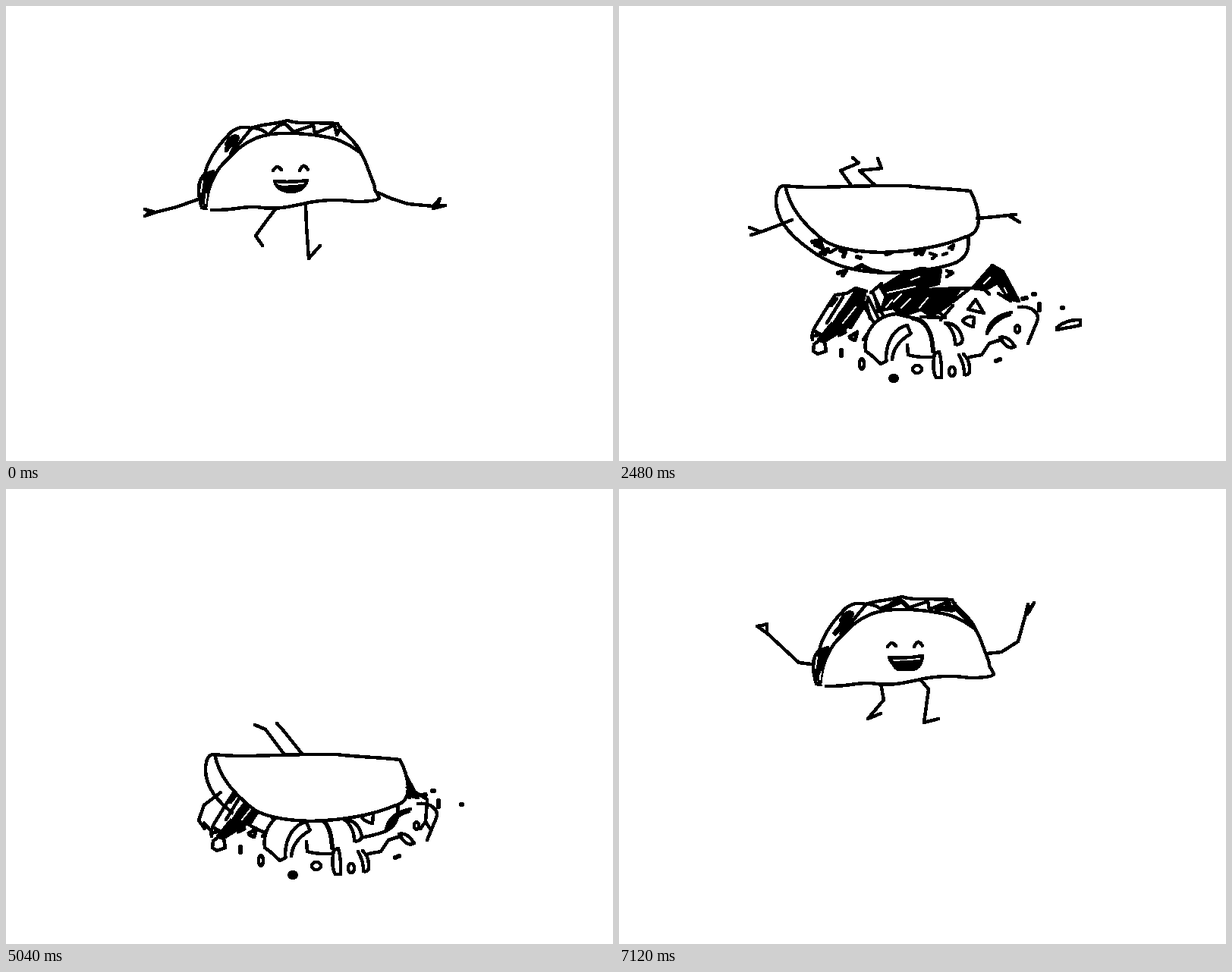
These frames come from a looping animation (800 px wide and 600 px high, 7.2 s). An HTML page without scripts:

```html
<!DOCTYPE html>
<html lang="en">
<head>
<meta charset="utf-8">
<title>Taco dive</title>
<style>
html, body { margin: 0; width: 100%; height: 100%; overflow: hidden; background: #fff; }
svg {
  display: block; width: 100vw; height: 100vh; shape-rendering: crispEdges;
  fill: none; stroke: #000; stroke-width: 4.5; stroke-linecap: round; stroke-linejoin: round;

  --kick: path("M355 268L342 285L329 303L338 316M395 262L396 290L399 333L414 316");
  --swap: path("M355 262L357 290L361 333L376 316M395 266L382 285L369 303L378 316");
  --tuck: path("M355 260L376 277L357 303L368 317M400 265L386 289L371 313L386 323");
  --hop: path("M349 261L357 282L341 307L346 320M398 262L387 301L370 313L382 321");
  --land: path("M343 266L347 287L326 312L343 305M396 261L406 273L400 317L419 312");

  --low: path("M253 255L225 265L197 272L183 268L190 272L183 277L197 272M490 246L508 254L530 261L563 264L572 254L568 264L579 263L563 267");
  --mid: path("M256 248L222 257L190 260L177 253L178 258L178 265L190 260M489 250L507 254L525 258L556 260L571 253L562 260L577 262L556 262");
  --flat: path("M254 250L225 249L195 249L176 243L190 247L176 252L195 249M487 245L503 244L520 242L550 241L568 233L556 240L573 243L550 241");
  --cheer: path("M252 240L235 238L193 199L180 190L186 189L193 187L193 199M483 226L502 224L524 210L534 174L537 161L539 170L545 159L536 174");

  --bent: path("M307 238L292 217L316 207L308 200M338 237L317 217L346 214L341 201");
  --straight: path("M310 236L298 220L286 204L272 198M334 236L318 216L310 206L301 196");

  --reach: path("M228 282L208 290L187 298L172 292M187 298L174 302M472 280L495 278L513 276L523 275M513 276L528 285");
  --dip: path("M228 282L206 302L190 330L180 336M190 330L190 341M472 280L494 298L505 326L500 336M505 326L514 337");
  --prop: path("M225 295L203 307L210 315L244 333M228 324L257 340M474 281L507 294L485 325L475 334M485 325L487 333");
  --push: path("M225 295L203 340L218 390L208 399M218 390L228 399M474 281L517 335L497 390L488 399M497 390L506 399");
}
.fill { fill: #000; }
.paper { fill: #fff; }
.up, .up *, .down, .down *, .pile, .pile * {
  animation-duration: 7.2s; animation-iteration-count: infinite; animation-timing-function: step-end;
}
.up { animation-name: show-up; }
.up > g { transform-origin: 372px 210px; animation-name: drift; }
.tilt { transform-origin: 377px 261px; animation-name: tilt; }
.up .legs { animation-name: run; }
.up .arms { animation-name: wave; }
.stuffed { animation-name: stuffed; }
.down { animation-name: show-down; }
.down > g { transform-origin: 340px 290px; animation-name: dive; }
.down .legs { animation-name: paddle; }
.down .arms { animation-name: dig; }
.crumbs { animation-name: crumbs; }
.meal { animation-name: meal; }
.pile { animation-name: slide; }
.chip { animation-name: chip; }
.spill { animation-name: spill; }
.right { animation-name: eat-right; }
.left { animation-name: eat-left; }
.middle { animation-name: eat-middle; }
.bits { animation-name: eat-bits; }

@keyframes show-up { 0% { visibility: visible } 30% { visibility: hidden } 94.44%, 100% { visibility: visible } }
@keyframes show-down { 0% { visibility: hidden } 30% { visibility: visible } 94.44%, 100% { visibility: hidden } }
@keyframes stuffed { 0% { opacity: 0 } 94.44%, 100% { opacity: 1 } }
@keyframes crumbs { 0% { opacity: 1 } 54.44%, 100% { opacity: 0 } }
@keyframes meal { 0% { opacity: 0 } 72.22%, 100% { opacity: 1 } }

@keyframes drift {
  0% { transform: translate(0, 0); animation-timing-function: steps(13) }
  14.44% { transform: translate(-27px, -45px); animation-timing-function: steps(9) }
  24.44% { transform: translate(-38px, -65px); animation-timing-function: steps(2) }
  26.66% { transform: translate(-38px, -86px); animation-timing-function: steps(3) }
  30% { transform: translate(-36px, -20px) scaleY(.15) }
  94.44% { transform: translate(8px, -75px) scaleY(.25); animation-timing-function: steps(1) }
  95.55% { transform: translate(5px, -118px) scaleY(1); animation-timing-function: steps(3) }
  98.88%, 100% { transform: translate(2px, -9px) scaleY(1) }
}
@keyframes tilt {
  0% { transform: rotate(0); animation-timing-function: steps(6) }
  6.66% { transform: rotate(6deg); animation-timing-function: steps(4) }
  11.11% { transform: rotate(1deg); animation-timing-function: steps(3) }
  14.44% { transform: rotate(6deg); animation-timing-function: steps(4) }
  18.88% { transform: rotate(0); animation-timing-function: steps(5) }
  24.44% { transform: rotate(2deg) }
  30%, 100% { transform: rotate(0) }
}
@keyframes run {
  0% { d: var(--kick); animation-timing-function: steps(3) }
  3.33% { d: var(--tuck); animation-timing-function: steps(3) }
  6.66% { d: var(--swap); animation-timing-function: steps(3) }
  10% { d: var(--kick); animation-timing-function: steps(4) }
  14.44% { d: var(--tuck); animation-timing-function: steps(3) }
  17.77% { d: var(--swap); animation-timing-function: steps(3) }
  21.11% { d: var(--kick); animation-timing-function: steps(3) }
  24.44% { d: var(--hop) }
  94.44% { d: var(--tuck); animation-timing-function: steps(4) }
  98.88%, 100% { d: var(--land) }
}
@keyframes wave {
  0% { d: var(--low); animation-timing-function: steps(6) }
  6.66% { d: var(--flat); animation-timing-function: steps(7) }
  14.44% { d: var(--mid); animation-timing-function: steps(9) }
  24.44% { d: var(--flat) }
  94.44% { d: var(--flat); animation-timing-function: steps(4) }
  98.88%, 100% { d: var(--cheer) }
}
@keyframes dive {
  0%, 30% { transform: translate(2px, -80px) scaleY(.2); animation-timing-function: steps(3) }
  33.33% { transform: translate(-3px, -4px); animation-timing-function: steps(1) }
  34.44% { transform: translate(0, 0); animation-timing-function: steps(4) }
  38.88% { transform: translate(3px, -3px) }
  43.33% { transform: translate(3px, -3px); animation-timing-function: steps(2) }
  45.55% { transform: translate(6px, -11px) }
  46.66% { transform: translate(6px, -11px); animation-timing-function: steps(2) }
  48.88% { transform: translate(19px, 30px) }
  53.33% { transform: translate(19px, 30px); animation-timing-function: steps(4) }
  57.77% { transform: translate(37px, 70px) }
  58.88% { transform: translate(37px, 70px); animation-timing-function: steps(5) }
  64.44% { transform: translate(56px, 113px) }
  83.33% { transform: translate(56px, 113px); animation-timing-function: steps(4) }
  87.77% { transform: translate(56px, 48px) }
  90% { transform: translate(56px, 48px); animation-timing-function: steps(4) }
  94.44%, 100% { transform: translate(40px, -150px) scaleY(.2) }
}
@keyframes paddle {
  0%, 34.44% { d: var(--bent) }
  43.33% { d: var(--bent); animation-timing-function: steps(2) }
  45.55% { d: var(--straight) }
  46.66% { d: var(--straight); animation-timing-function: steps(2) }
  48.88% { d: var(--bent) }
  53.33% { d: var(--bent); animation-timing-function: steps(4) }
  57.77%, 100% { d: var(--straight) }
}
@keyframes dig {
  0%, 46.66% { d: var(--reach); opacity: 1 }
  50% { d: var(--reach); animation-timing-function: steps(2) }
  52.22% { d: var(--dip); opacity: 1 }
  55.55% { d: var(--dip); opacity: 0 }
  61.11% { d: var(--dip); opacity: 1 }
  65.55% { d: var(--dip); opacity: 1; animation-timing-function: steps(10) }
  76.66% { d: var(--prop); opacity: 1 }
  83.33% { d: var(--prop); opacity: 1; animation-timing-function: steps(4) }
  87.77% { d: var(--push); opacity: 1 }
  90% { d: var(--push); opacity: 1; animation-timing-function: steps(4) }
  94.44%, 100% { d: var(--reach); opacity: 1 }
}
@keyframes slide {
  0% { visibility: hidden; transform: translate(-9px, -8px) }
  31.11% { visibility: visible; transform: translate(-9px, -8px) }
  34.44% { visibility: visible; transform: translate(0, 0); animation-timing-function: steps(4) }
  38.88% { visibility: visible; transform: translate(9px, 16px) }
  58.88% { visibility: visible; transform: translate(9px, 16px); animation-timing-function: steps(5) }
  64.44% { visibility: visible; transform: translate(16px, 18px) }
  80%, 100% { visibility: hidden; transform: translate(16px, 18px) }
}
@keyframes chip {
  0%, 34.44% { transform: translate(0, 0); opacity: 1; animation-timing-function: steps(4) }
  38.88% { transform: translate(7px, 4px); opacity: 1 }
  68.88%, 100% { transform: translate(7px, 4px); opacity: 0 }
}
@keyframes spill { 0% { opacity: 0 } 55.55% { opacity: 1 } 70%, 100% { opacity: 0 } }
@keyframes eat-right { 0% { opacity: 1 } 71.11%, 100% { opacity: 0 } }
@keyframes eat-left { 0% { opacity: 1 } 73.33%, 100% { opacity: 0 } }
@keyframes eat-middle { 0% { opacity: 1 } 75.55%, 100% { opacity: 0 } }
@keyframes eat-bits { 0% { opacity: 1 } 76.66%, 100% { opacity: 0 } }
</style>
</head>
<body>
<svg viewBox="0 0 800 600">
  <!-- upright, facing us -->
  <g class="up"><g>
    <path class="arms"/>
    <path class="legs"/>
    <g class="tilt">
      <path class="paper" d="M264 267L258 266C252 246 252 230 262 222C266 202 280 183 297 166Q308 157 323 161C340 155 356 156 371 151C385 156 400 153 437 155C440 165 452 170 458 179C467 187 470 197 472 208Q472 214 467 216"/>
      <path class="paper" stroke="none" d="M272 269C350 266 400 259 492 253L472 194C430 166 350 160 318 180C290 200 266 236 264 267Z"/>
      <path d="M271 269C300 270 310 264 330 265C360 270 380 263 400 259C430 254 445 256 460 258C475 258 490 257 492 253C490 246 484 243 486 238L478 217C470 195 468 193 462 190C440 174 425 173 405 170C380 167 350 166 330 174C308 183 300 195 285 209C272 224 265 245 263 267"/>
      <path d="M323 161Q336 160 346 170Q362 152 370 157L379 166L405 157L407 168L433 157L436 170L441 160M290 182Q297 169 305 172Q289 184 290 191L306 174L296 195L323 162M459 180L465 190"/>
      <path class="fill" d="M262 222L273 218L267 240L262 262L257 250Q254 235 262 222Z"/>
      <path stroke="#fff" stroke-width="2" d="M259 231L257 245M264 248L263 260"/>
      <path d="M352 217Q357 208 363 216M387 217Q392 205 398 216"/>
      <path class="paper" d="M354 231Q375 233 397 230Q392 245 375 245Q358 244 354 231Z"/>
      <path class="fill" stroke-width="2" d="M356 237Q375 239 395 235Q388 244 375 245Q360 244 356 237Z"/>
      <g class="stuffed">
        <path stroke-width="7" d="M283 199L301 178L292 200M345 167L370 157M417 166L438 168L430 161"/>
        <path d="M262 250L268 222L270 235M372 157L382 166M440 165L462 187L452 173"/>
        <path class="paper" d="M356 231Q376 233 398 229Q396 247 383 247H366Q359 244 356 231Z"/>
        <path class="fill" stroke-width="2" d="M359 237L395 235Q392 245 383 247H366Z"/>
      </g>
    </g>
  </g></g>

  <!-- head down: open edge behind the food -->
  <g class="down"><g>
    <path class="paper" d="M219 237Q208 236 207 255C206 278 222 300 250 320C280 344 315 351 355 352C390 350 420 348 445 338C460 330 462 318 460 303"/>
    <g class="crumbs">
      <path stroke-width="6" d="M255 311l10 -2l3 10l-9 -4l7 2M266 326l9 -5l-4 6M292 322l6 3l-2 5M309 321l4 2M314 331l4 1M289 352l10 -3l-4 6M312 346l8 -4l9 6l12 2l4 1M352 327l5 -1M391 327l11 -6l-3 6"/>
      <path d="M278 325L287 320M410 326l8 3l-5 4M427 328l5 -2M435 319l6 -4l-2 6M325 344l12 6M432 349l8 3l-8 5"/>
    </g>
  </g></g>

  <g class="pile">
    <g class="left">
      <path d="M255 440C252 428 262 419 270 404L285 381L300 379L312 372L326 376M280 395L287 386M274 418L295 384M328 384L343 414M321 392L336 418M335 379L348 408"/>
      <path class="fill" d="M263 440L296 400L312 376L324 380L320 396L290 430L270 443Z"/>
      <path stroke="#fff" stroke-width="2" d="M296 392L281 416M312 397L295 418"/>
      <path stroke-width="5" d="M257 428l8 5l-7 2M290 434l8 -4M294 430L311 411L305 424L328 388M304 436l10 -6l-3 11l-6 -3M326 392L331 412"/>
      <path d="M257 446L256 455L262 459L273 455L271 443L264 441Z"/>
    </g>
    <g class="middle">
      <path class="paper" stroke="none" d="M325 455Q328 412 365 405L440 400L455 440L412 463L352 468L345 472Z"/>
      <path class="fill" d="M345 372L375 353L398 346L424 349L421 366L387 375L450 372L436 393L412 409L398 400L374 408L361 398L346 401L352 383Z"/>
      <path d="M332 378L346 366M342 403L338 386M420 374L463 372L440 390M398 410L430 411L414 397M440 395L424 414M435 352L438 350"/>
      <path stroke="#fff" stroke-width="2" d="M362 390L372 380M372 398L384 386M354 378L390 370M396 398L407 385M352 397L360 388M385 361L396 357"/>
      <path d="M325 455C322 428 340 408 365 406L386 411M325 455L332 460L345 472L353 468M352 465C352 440 365 424 380 421M360 466Q362 445 385 432M380 421L384 431M380 447L381 460Q395 464 412 463M322 440L329 430"/>
      <path stroke-width="6" d="M388 412Q412 415 414 455"/>
      <path d="M430 418Q448 418 453 440Q451 448 443 446Q443 428 430 418Z"/>
    </g>
    <g class="right">
      <path class="fill" d="M466 372L492 342L506 350L527 389L514 386L499 365L482 374Z"/>
      <path stroke="#fff" stroke-width="2" d="M481 366L489 358M508 372L511 378"/>
      <path d="M482 374L488 380M500 379L516 389M527 397C545 395 555 406 551 416L539 445M485 432Q488 410 517 404M485 432Q495 413 515 407M462 463L478 460L488 445L500 441M494 443L505 440"/>
      <path d="M460 400L470 387L481 405ZM453 415Q460 407 468 411L467 423Q457 421 453 415ZM502 437Q512 434 522 449Q512 455 502 437Z"/>
      <ellipse cx="525" cy="426" rx="3" ry="5"/>
      <path stroke-width="6" d="M532 386l5 -1M546 380h2M554 393v8M584 398h1M497 468l5 -2"/>
    </g>
    <g class="spill">
      <path d="M261 352L264 385L265 415M502 337L522 358L543 390M510 356L531 385M506 370L538 392"/>
      <path stroke-width="5" d="M284 366l9 6l-8 3M290 375L312 370L296 386L326 374L310 392L336 378L322 400L345 384L334 412M275 396L300 384L270 430M286 392L318 384L300 412"/>
      <path d="M344 381L362 388L352 402M432 382L448 376L440 392M470 374L486 366L478 382L492 372"/>
    </g>
    <g class="bits">
      <path class="paper" d="M416 458Q412 480 418 490H425Q426 470 422 456ZM448 460Q456 475 455 486Q463 488 462 478Q462 466 454 459"/>
      <ellipse cx="439" cy="482" rx="4" ry="6"/>
      <ellipse cx="393" cy="479" rx="6" ry="5"/>
      <ellipse stroke-width="6" cx="362" cy="491" rx="4" ry="3"/>
      <ellipse cx="320" cy="472" rx="3" ry="7"/>
      <path stroke-width="6" d="M293 454v7"/>
    </g>
    <path class="chip" d="M577 424Q590 413 608 414L608 421L577 427Z"/>
  </g>

  <!-- head down: shell, limbs and the scooped food -->
  <g class="down"><g>
    <path class="legs"/>
    <path class="paper" d="M219 237C260 242 300 236 380 237C400 240 440 241 463 244C468 253 473 265 474 280C474 295 468 302 455 305C430 316 390 324 345 325C310 324 280 318 266 306C240 284 225 265 219 237Z"/>
    <path class="arms"/>
    <g class="meal">
      <path class="paper" stroke="none" d="M217 246C225 270 240 292 266 308C300 326 390 328 462 302L460 325C440 348 350 358 290 343C235 325 205 285 210 250Z"/>
      <path d="M219 237C225 265 240 284 266 306C280 318 310 324 345 325C390 324 430 316 458 304M219 237Q208 237 207 255C205 280 225 305 258 327C290 348 330 352 360 352C390 350 420 348 445 338C460 330 466 318 465 303"/>
      <path d="M244 317Q275 342 334 345M244 312L251 330M460 305Q461 332 432 344M447 310L450 323"/>
      <path class="fill" d="M217 252L224 262L236 276L239 290L227 283L218 265Z"/>
      <path d="M225 288L243 310L233 289L247 304L240 288L255 296"/>
      <path stroke-width="6" d="M257 310l8 2l-6 5M268 327l4 -3M283 323l3 3M294 326h3M307 332l6 -3M312 323l10 -1M384 327l18 -2l-12 6M437 319l13 -4"/>
      <path d="M328 327Q345 328 354 345Q337 345 328 327ZM360 340Q358 326 382 327L390 335Q380 348 366 346ZM388 343L408 322L413 344L420 309L428 330L433 310L441 329M394 336L430 326"/>
    </g>
  </g></g>
</svg>
</body>
</html>
```
